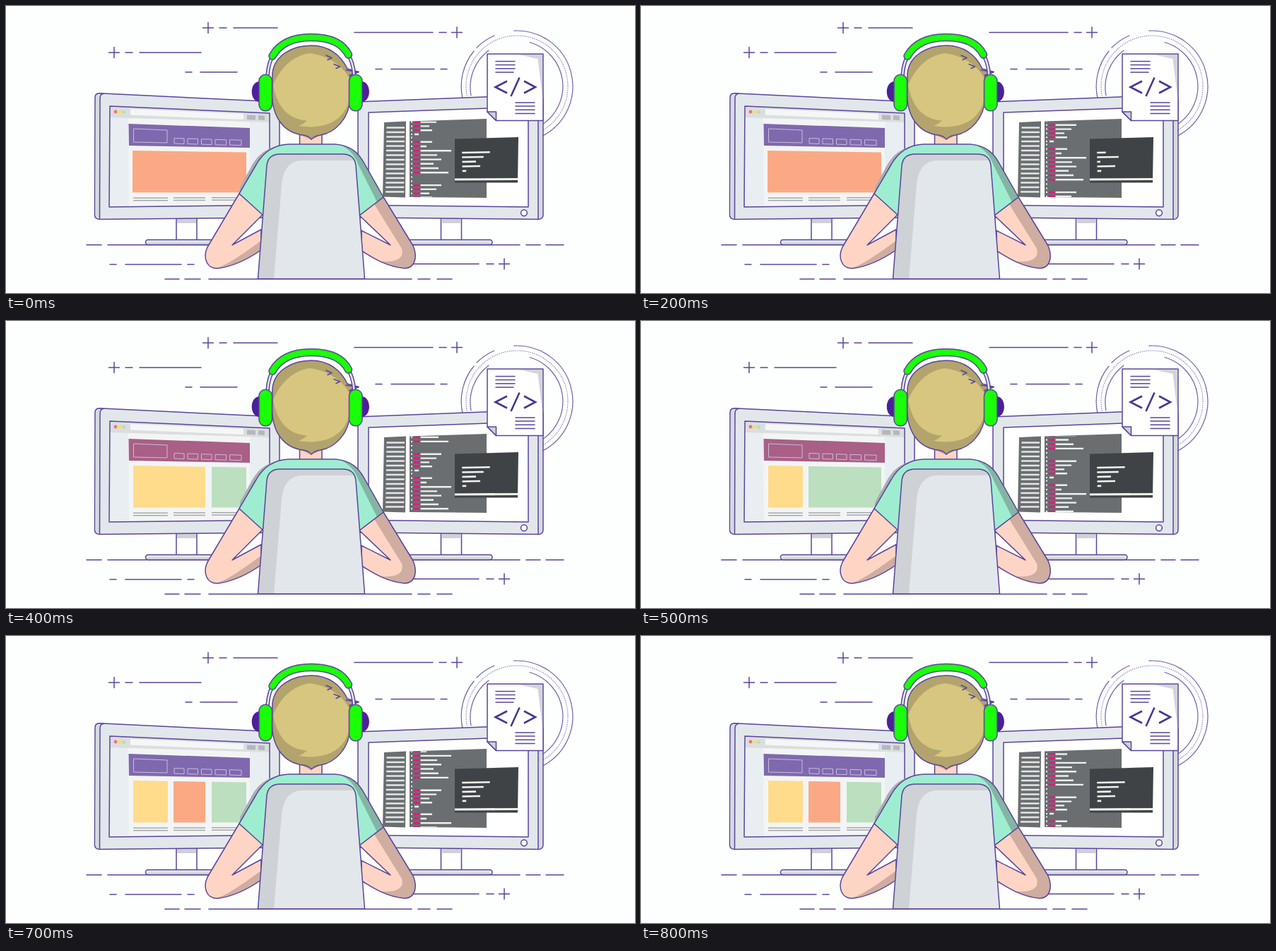
An HTML page for the animation above (900 ms loop, 890 by 407 pixels).

```html
<!DOCTYPE html>
<html lang="en">
<head>
<meta charset="utf-8">
<title>Developer at work</title>
<style>
html, body { margin: 0; width: 100%; height: 100%; overflow: hidden; background: #fdfffe; }
svg { display: block; width: 890px; height: 407px; }
.o { stroke: #5a459c; stroke-width: 1.5; stroke-linejoin: round; stroke-linecap: round; }
.n { fill: none; }
.g { fill: #e2e7eb; }
.w { fill: #fff; }
.s { fill: #ced1d5; }
.skin { fill: #fed5c4; }
.skinDark { fill: #cfada0; }
.green { fill: #1aff08; }
.panel { fill: #6b6e70; }
</style>
</head>
<body>
<svg viewBox="0 0 890 407">
  <defs>
    <clipPath id="codeClip"><path d="M571 163.500L680 163V271H571Z"/></clipPath>
  </defs>

  <!-- background strokes -->
  <path id="decor" class="o n"/>

  <!-- rings behind the document -->
  <g class="n o" style="stroke-width:1.2" opacity=".85">
    <path d="M719 35.100A79 79 0 0 1 759 184.300M646 131A79 79 0 0 1 662 64M666 59A79 79 0 0 1 691 42"/>
    <circle cx="723" cy="114" r="72" stroke-dasharray=".2 2.600"/>
    <path d="M741 51.500A65 65 0 0 1 759 168M658 127A65 65 0 0 1 683 63"/>
  </g>

  <!-- left monitor -->
  <path class="o w" d="M241 300H270V333H241Z"/>
  <path class="s" d="M242 302H269V308H242Z"/>
  <rect class="o g" x="197.500" y="331.500" width="110" height="7" rx="3.500"/>
  <path class="s" d="M201 335.500H300V337.500H201Z"/>
  <path class="o g" d="M132 123.800L387 136V300L132 302.500Q125.500 302 125.500 296L126 130Q126 124 132 123.800Z"/>
  <path fill="#d6dadf" d="M132 125Q127 125 127 131L126.500 296Q127 301 132 301.500Z"/>
  <path class="o n" d="M138 124.200Q133 125 133 131L132.500 302"/>
  <path fill="#e9eef2" d="M147 142L373 152V283L146 285Z"/>
  <path fill="#f3f5f5" d="M173 158L345 164V283L174 285Z"/>
  <path fill="#dbdedf" d="M147 142L373 152V165L147 158Z"/>
  <path fill="#f5f7f7" d="M176 146L336 153V161L176 154.500Z"/>
  <circle cx="155" cy="150" r="2.400" fill="#f0707f"/>
  <circle cx="161" cy="150.300" r="2.400" fill="#fbe04f"/>
  <circle cx="166.700" cy="150.600" r="2.400" fill="#b9dfae"/>
  <path fill="#b4b8bb" d="M341 154.500L353 155V161.500L341 161ZM357 155L366 155.400V162L357 161.500Z"/>
  <path id="header" d="M173.500 167L345 173V201L174 198Z"/>
  <path class="n" stroke="#c9bddd" d="M180.500 174L228 176V194L180.500 193ZM238 187.500L252 188V195.500L238 195ZM257 188L271.500 188.500V196L257 195.500ZM276.500 188.700L291 189.200V196.600L276.500 196.100ZM296 189.300L311.500 189.800V197.200L296 196.700ZM316.500 189.700L333 190.300V197.600L316.500 197.100Z"/>
  <g id="blocks"></g>
  <path stroke="#a6a9ab" stroke-width="1.500" d="M180 272.300H229M180 275.800H229M237 272H282M237 275.500H282M291 271.700H332M291 275.200H330"/>
  <path class="o n" d="M147 142L373 152V282.500L146 285Z"/>

  <!-- right monitor -->
  <path class="o w" d="M615.500 300H644.500V333H615.500Z"/>
  <path class="s" d="M616.500 302H643.500V308H616.500Z"/>
  <rect class="o g" x="560" y="331.500" width="128" height="7" rx="3.500"/>
  <path class="s" d="M575 335.500H684V337.500H575Z"/>
  <path class="o g" d="M498 136L754 126Q760 126 760 132V296Q760 302 754 302.500L498 300Z"/>
  <path fill="#d6dadf" d="M754 127.500Q759 127 759 132V296Q759 301 754 301.500Z"/>
  <path class="o n" d="M748 126.200Q753 127 753 133V302.500"/>
  <path class="o w" d="M513 151L739 143V285L513 282.500Z"/>
  <circle class="o w" cx="733" cy="293.300" r="4.400"/>
  <path class="panel" d="M535 165L566 163.500L565 271.500L533 270.500Z"/>
  <path id="sidebar" stroke="#e4e6e6" stroke-width="2.700"/>
  <path class="panel" d="M571 163.500L680 160V272L571 271Z"/>
  <g clip-path="url(#codeClip)"><g id="code" stroke-width="2.400">
    <path id="ticks" stroke="#eceeee" stroke-width="2"/>
    <path id="keys" stroke="#e0197f" stroke-width="2.600"/>
    <path id="lines" stroke="#eef0f0"/>
  </g></g>
  <path fill="#404345" d="M635 188.500L725 186L724 250.500H635Z"/>
  <path stroke="#eef0f0" stroke-width="3.200" d="M635 246L724 245.500"/>
  <path id="term" stroke="#f0f2f2" stroke-width="2.600" transform="rotate(-1 645 225)"/>

  <!-- document -->
  <path class="o w" d="M681 68H760V162.500H693.500L681 150Z"/>
  <path fill="#d3d5d9" d="M726 69H759V128L752.500 75Z"/>
  <path class="o s" d="M681 150H693.500V162.500Z"/>
  <path class="o n" d="M693 78.500H720M693 83.500H720M693 88.700H720M693 94H718M721 137H748M721 142H748M721 147.200H748M721 152.500H748"/>
  <path class="n" stroke="#4b358f" stroke-width="2.600" d="M709 106.500L692.500 115L709 123.500M726.500 101.500L714.500 128M733 106.500L749 115L733 123.500"/>

  <!-- head -->
  <path class="o skin" d="M415.500 176H447V198H415.500Z"/>
  <path class="skinDark" d="M416.300 177H446V183L432 190L416.300 183Z"/>
  <path class="o" fill="#b2a46c" d="M377 95C380 70 405 56 432 56C457 56 474 70 483 89L499 93.500L487 98.500V130C486 160 465 180 445 183Q437 184 432 189Q428 184 420 183C395 180 377 160 376.500 125Z"/>
  <path fill="#d6c680" d="M378 112C388 88 406 70 430 67C456 70 478 86 486 103V130C482 157 458 177 414 170Q421 167.500 426 162.500C402 161 384 146 378 112Z"/>
  <path class="o n" d="M453 70L461 73.500L455 76.500M464 82.500L472.500 86L467 88.500M481 91L499 93.500L486 98.500"/>

  <!-- headphones -->
  <g class="n">
    <path d="M370 99C371 84 374 74 381 65M492.500 99C492 84 488 74 482 65" stroke="#5a459c" stroke-width="5.500"/>
    <path d="M370 99C371 84 374 74 381 65M492.500 99C492 84 488 74 482 65" stroke="#e2e7eb" stroke-width="2.500"/>
  </g>
  <g class="n" stroke-linecap="round">
    <path d="M377 71C388 51 410 44.500 432 44.500C455 44.500 475 50 484.500 69" stroke="#5a459c" stroke-width="11.500"/>
    <path d="M377 71C388 51 410 44.500 432 44.500C455 44.500 475 50 484.500 69" stroke="#1aff08" stroke-width="8.500"/>
  </g>
  <path fill="#4d209b" d="M359 107C344 107 344 136 359 136ZM503 107C517.500 107 517.500 136 503 136Z"/>
  <rect class="o green" x="358" y="97.300" width="18.500" height="51.500" rx="9"/>
  <rect class="o green" x="485.500" y="97.300" width="18.500" height="51.500" rx="9"/>

  <!-- arms -->
  <path class="skin" d="M330 266L285 342C278 357 284 373 300 372C325 369 345 357 361 346V317L320 339L364 295Z"/>
  <path class="skinDark" d="M297 372C313 368 340 348 362 332V346C345 357 325 370 297 372Z"/>
  <path class="o n" d="M330 266L285 342C278 357 284 373 300 372C325 369 345 357 361 346V317L320 339L364 295Z"/>
  <path class="skin" d="M534 271L576 340C583 357 578 372 564 372C540 370 520 358 503 347V318.500L544 339L500 297Z"/>
  <path class="skinDark" d="M534 271L576 340C583 357 578 372 564 372C552 371 540 367 531 362C552 364 564 358 560 344L521 281Z"/>
  <path class="o n" d="M534 271L576 340C583 357 578 372 564 372C540 370 520 358 503 347V318.500L544 339L500 297Z"/>

  <!-- shirt and chair -->
  <path fill="#a9afb2" d="M380 200C364 204 355 214 348 226L331 257V266L356 222Z"/>
  <path fill="#9fedd0" d="M400 196H466C490 198 500 210 508 225L534 271L500 297H364L330 266L354 225C364 207 378 197 400 196Z"/>
  <path fill="#84b5a2" d="M472 196.500C492 200 501 212 508 225L534 271L525 278L499 226C494 212 486 203 472 196.500Z"/>
  <path class="o n" d="M400 196H466C490 198 500 210 508 225L534 271L500 297H364L330 266L354 225C364 207 378 197 400 196Z"/>
  <path class="g" d="M356.500 387L369 226Q371 210 388 210H476Q493 210 495 226L507.500 387Z"/>
  <path class="s" d="M356.500 387L369 226Q371 210 388 210H476Q489 210 493 219H420C402 219 392 231 390 253L379 387Z"/>
  <path class="o n" d="M356.500 387L369 226Q371 210 388 210H476Q493 210 495 226L507.500 387Z"/>
</svg>
<script>
const $ = id => document.getElementById(id);
const setPath = (id, d) => $(id).setAttribute('d', d);
const bar = (x1, x2, y) => `M${x1} ${y}H${x2}`;
const plus = (x, y) => `M${x - 7.5} ${y}h15M${x} ${y - 7.5}v15`;

// rows of [y, start, end, start, end, ...]
const dashes = [
  [31, 302, 312, 322, 384], [66, 169, 179, 189, 276], [93.7, 254, 263, 275, 327],
  [37.5, 493, 604, 613, 623], [89.6, 523, 532, 545, 606, 615, 624],
  [338.8, 114, 135, 144, 727, 736, 756, 764, 789],
  [366.5, 147, 156, 169, 248, 257, 266], [365.8, 574, 669, 680, 690],
  [387.3, 225, 245, 253, 275, 287, 574, 583, 600, 610, 631]
];
let decor = plus(286, 31) + plus(153, 66) + plus(638, 37.5) + plus(705, 365.8);
for (const [y, ...xs] of dashes)
  for (let i = 0; i < xs.length; i += 2) decor += bar(xs[i], xs[i + 1], y);
setPath('decor', decor);

let side = '';
for (let i = 0; i < 15; i++) side += bar(538.5 - i * .1, 564 - i * .05, 172.5 + i * 6.5);
setPath('sidebar', side);

// one code listing, repeated every PERIOD pixels; y 0 is the short line
const PERIOD = 95.3;
const ends = [616, 609, 599, 603, 0, 0, 603, 595, 630, 610, 616, 605, 612, 626];
let ticks = '', keys = '', lines = '';
for (let p = -2; p < 2; p++) {
  for (let i = 0; i < 16; i++) {
    const row = i - 4;
    const y = p * PERIOD + (row < 1 ? row * 5.8 : row * 6.2 - 1.6);
    ticks += bar(573, 575, y);
    if (row === 0) lines += bar(578, 584, y);
    if (!ends[i]) continue;
    keys += bar(577, 586, y);
    lines += bar(586.5, ends[i], y);
  }
}
setPath('ticks', ticks);
setPath('keys', keys);
setPath('lines', lines);

const YELLOW = '#ffdc8c', ORANGE = '#fba985', GREEN = '#bcdfc0';
const layouts = [
  [[179, 340, ORANGE]],
  [[180, 282, YELLOW], [291, 340, GREEN]],
  [[180, 229, YELLOW], [237, 340, GREEN]],
  [[180, 229, YELLOW], [237, 282, ORANGE], [291, 340, GREEN]]
];
const edge = x => 205 + (x - 180) * .016;
const block = ([a, b, fill]) =>
  `<path fill="${fill}" d="M${a} ${edge(a)}L${b} ${edge(b)}V264.500H${a}Z"/>`;

const prompts = [
  [685, 676, 665, 671, 651],
  [658, 676, 650, 671, 651],
  [685, 658, 665, 650, 651]
];

let shown = -1;
function draw(now) {
  const tick = Math.max(1, Math.floor(now % 900 / 100));
  if (tick !== shown) {
    shown = tick;
    $('code').setAttribute('transform', `translate(0 ${172 + tick * 10})`);
    $('header').setAttribute('fill', tick >= 3 && tick < 6 ? '#a95f86' : '#7f69ae');
    const layout = tick < 3 ? 0 : tick < 5 ? 1 : tick < 7 ? 2 : 3;
    $('blocks').innerHTML = layouts[layout].map(block).join('');
    const prompt = tick === 2 || tick === 3 ? 1 : tick === 6 ? 2 : 0;
    setPath('term', prompts[prompt].map((x, i) => bar(645.5, x, 208 + i * 6.5)).join(''));
  }
  requestAnimationFrame(draw);
}
draw(performance.now());
</script>
</body>
</html>
```
